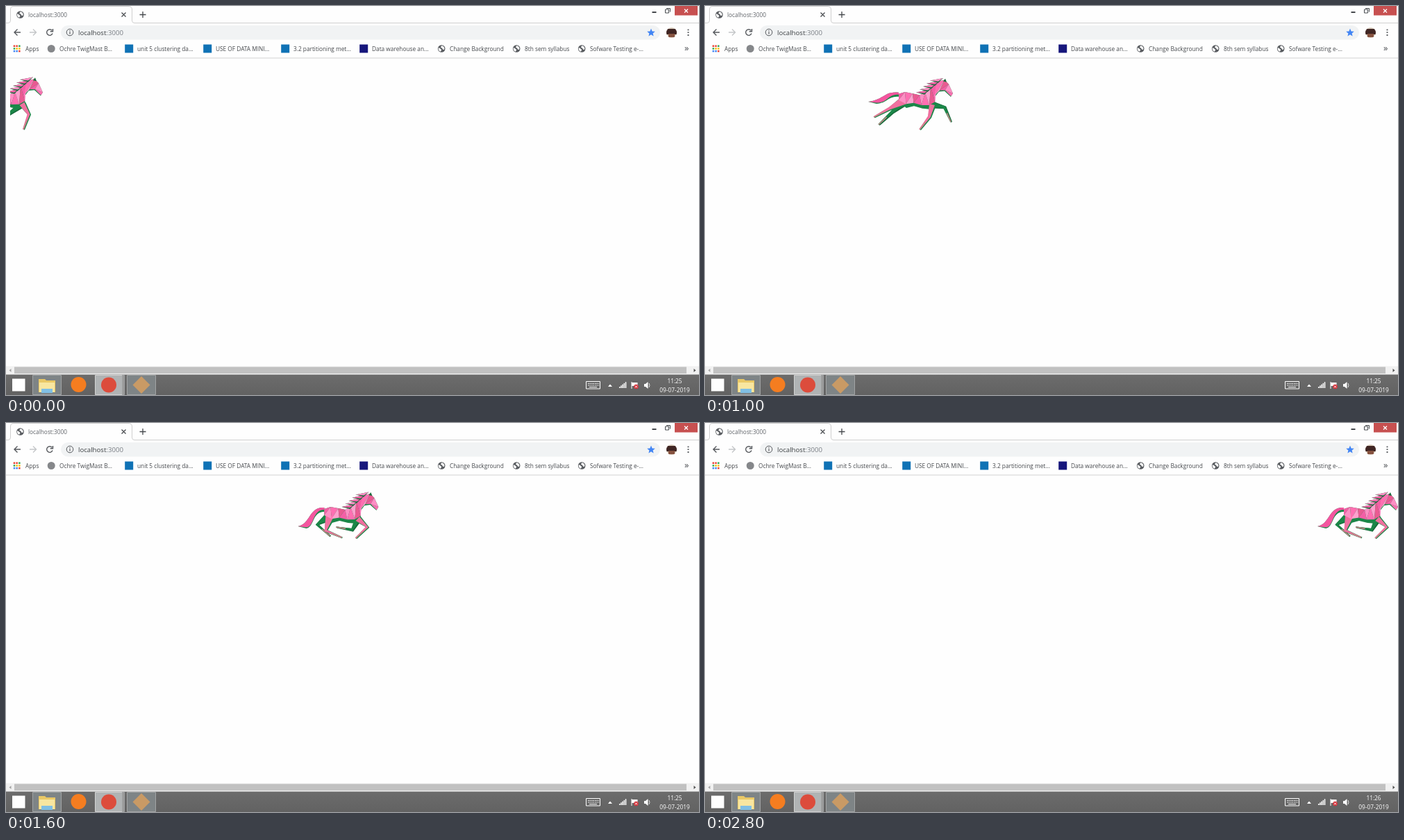
Animation of 998 by 561 pixels, one loop 3000 ms. Source, as an HTML page:

```html
<!DOCTYPE html>
<html lang="en">
<head>
<meta charset="utf-8">
<title>localhost:3000</title>
<style>
  html, body { margin: 0; width: 100%; height: 100%; overflow: hidden; background: #fefefe; }
  svg { display: block; width: 998px; height: 561px; font: 8.3px "Open Sans", "Noto Sans", sans-serif; }
</style>
</head>
<body>
<svg viewBox="0 0 998 561">
  <defs>
    <clipPath id="page"><rect x="6" y="76" width="992" height="443"/></clipPath>
    <clipPath id="face"><circle cx="958.5" cy="38.5" r="7.5"/></clipPath>
    <linearGradient id="bar" x2="0" y2="1"><stop stop-color="#6c6c6c"/><stop offset="1" stop-color="#626262"/></linearGradient>
    <g id="globe">
      <circle r="5.3" fill="#5a5d61"/>
      <path d="M-4.2-1.5L-1 .4 0 2-1.5 4.2A4.3 4.3 0 0 1-4.2-1.5M.2-4.2L-1.3-2 .8-.8 2.2 1.4 4.1 1A4.3 4.3 0 0 0 .2-4.2" fill="#fff"/>
    </g>
  </defs>

  <!-- window frame and tab -->
  <path d="M0 24.5H3Q6.5 24.5 6.5 21V5Q6.5.5 11 .5H176Q181.5.5 181.5 5V21Q181.5 24.5 185 24.5H998" fill="none" stroke="#cfcfcf"/>
  <use href="#globe" x="20.5" y="12.5"/>
  <text x="32" y="15.5" fill="#5f6368">localhost:3000</text>
  <g fill="none" stroke="#45484c" stroke-width="1.3">
    <path d="M166.500 9.500l6 6m0-6l-6 6M192.500 12.500h9m-4.500-4.500v9"/>
    <path d="M930.500 9h6" stroke-width="2"/>
    <path d="M949.500 5h5v5h-5zM951 3.500h5.500v5" stroke-width="1"/>
  </g>
  <rect x="963" width="33" height="13.5" fill="#c75050"/>
  <path d="M977 4.500l5 5m0-5l-5 5" stroke="#fff" stroke-width="1.3"/>

  <!-- toolbar -->
  <rect x="79" y="28" width="863" height="20.5" rx="10.25" fill="#f1f3f4"/>
  <g fill="none" stroke="#55585c" stroke-width="1.4">
    <path d="M21 38H12m4.500-4.500L12 38l4.500 4.500"/>
    <path d="M34 38h9.500m-4.500-4.500l4.500 4.500-4.500 4.500" stroke="#c4c6c9"/>
    <path d="M66.300 35.300A4.300 4.300 0 1 0 67 39.500M67.500 33v3.800h-3.800"/>
    <circle cx="92" cy="38" r="4.800" stroke-width="1"/>
    <path d="M92 37.200v3.400M92 35v1.200" stroke-width="1.2"/>
  </g>
  <text x="104" y="41.5" font-size="9.65" fill="#3c4043">localhost<tspan fill="#777c82">:3000</tspan></text>
  <path d="M929 32.500l1.600 3.900 4.200.3-3.200 2.700 1 4.100-3.600-2.200-3.600 2.200 1-4.100-3.200-2.700 4.200-.3z" fill="#4285f4"/>
  <g clip-path="url(#face)">
    <path d="M950 30h17v17h-17z" fill="#d9cdbd"/>
    <path d="M950 33h17v8h-17z" fill="#3f2523"/>
    <path d="M954 40h9v5h-9z" fill="#86523f"/>
  </g>
  <path d="M982.500 33.500v1.800m0 2v1.800m0 2v1.800" stroke="#55585c" stroke-width="1.9"/>
  <g id="bookmarks" fill="#46494d"></g>
  <path d="M0 75h998" stroke="#d2d2d2"/>

  <g clip-path="url(#page)"><g id="horse"></g></g>

  <!-- horizontal scrollbar -->
  <path d="M0 519.500h998v12H0z" fill="#f1f1f1"/>
  <path d="M12 520.500h968v9.500H12z" fill="#c1c1c1"/>
  <path d="M7.500 523v5l-3-2.500z" fill="#a3a3a3"/>
  <path d="M990.500 523v5l3-2.500z" fill="#505050"/>

  <!-- taskbar -->
  <path d="M0 531.500h998V561H0z" fill="url(#bar)"/>
  <path d="M9 537.500h18.500v18H9z" fill="#fff"/>
  <g stroke="#a2a4a5" fill="#7e8486">
    <path d="M38.500 532.500h41v28h-41z"/>
    <path d="M128.500 532.500h39v28h-39z" fill="#b0b3b4" stroke="#d2d2d2"/>
    <path d="M167.500 532.500h3v28h-3z" fill="#999"/>
    <path d="M174.500 532.500h41v28h-41z"/>
  </g>
  <path d="M47 538h9l2 2h13v17H47z" fill="#e9c866"/>
  <path d="M48 543h22v14H48z" fill="#f8e6a0"/>
  <path d="M51 552h16v6H51z" fill="#80bfe4"/>
  <circle cx="104.5" cy="546" r="11" fill="#f57d20"/>
  <circle cx="148" cy="546.5" r="11" fill="#dc4c3c"/>
  <path d="M195 534l12.500 12.500L195 559l-12.500-12.500z" fill="#c99a65"/>

  <!-- tray -->
  <g fill="none" stroke="#fff">
    <path d="M835.500 541.500h20v10.500h-20z"/>
    <path d="M838 544.500h16M838 547h16" stroke-dasharray="1.5 1"/>
    <path d="M840 549.700h11"/>
    <path d="M926 544q2 3 0 6" stroke-width=".8"/>
  </g>
  <g fill="#fff">
    <path d="M867 549h6l-3-3.500z"/>
    <g id="signal"></g>
    <path d="M900.500 542h1v10h-1zm1 1h8v5h-8zM919 545h2l3.500-3v10l-3.500-3h-2z"/>
  </g>
  <circle cx="907.5" cy="549" r="3.3" fill="#d5333b"/>
  <path d="M906 547.500l3 3m0-3l-3 3" stroke="#fff" stroke-width=".9"/>
  <g fill="#fff" text-anchor="middle">
    <text id="clock" x="963" y="544"></text>
    <text x="963" y="556.5">09-07-2019</text>
  </g>
</svg>

<script>
const byId = id => document.getElementById(id);
const repeat = (count, draw) => Array.from({ length: count }, (_, i) => draw(i)).join('');
const rect = (x, y, w, h, fill = '') => `<rect x="${x}" y="${y}" width="${w}" height="${h}" ${fill && `fill="${fill}"`}/>`;

// Bookmark: label start, label, icon painter given its centre
const globe = x => `<use href="#globe" x="${x}" y="61.5"/>`;
const square = color => x => rect(x - 6, 55.5, 12, 12, color);
const disc = x => `<circle cx="${x}" cy="61.5" r="5.5" fill="#85878a"/>`;
const dotColors = ['#ea4335', '#34a853', '#fbbc05', '#4285f4'];
const grid = x => repeat(9, i =>
  rect(x - 5.5 + i % 3 * 3.7, 56.5 + Math.floor(i / 3) * 3.7, 2.5, 2.5, dotColors[Math.floor(i / 2) % 4]));
const blue = square('#0f72b5');
byId('bookmarks').innerHTML = [
  [28, 'Apps', grid],
  [77, 'Ochre TwigMast B...', disc],
  [189, 'unit 5 clustering da...', blue],
  [302, 'USE OF DATA MINI...', blue],
  [414, '3.2 partitioning met...', blue],
  [527, 'Data warehouse an...', square('#17177c')],
  [639, 'Change Background', globe],
  [747, '8th sem syllabus', globe],
  [841, 'Sofware Testing e-...', globe]
].map(([x, label, icon]) => `${icon(x - 11.8)}<text x="${x}" y="64.5">${label}</text>`).join('') +
  '<text x="977" y="64.5" font-size="13">»</text>';

byId('signal').innerHTML = repeat(5, i => rect(883 + i * 2.2, 549 - i * 1.7, 1.5, 2 + i * 1.7));

const GREEN = '#1b8748', DARK = '#17693a';
const pinks = ['#f55fa6', '#ff8fc5', '#ff6fb2', '#ffa0ce', '#ea5a92'];

// Upper and lower contour of the trunk, neck and head
const topLine = [[38, 124], [47, 121], [58, 123], [68, 125], [76, 121], [84, 112], [93, 105], [104, 102], [110, 108], [116, 121]];
const underLine = [[38, 136], [49, 144], [60, 141], [72, 144], [84, 145], [91, 137], [89, 128], [96, 119], [104, 118], [113, 126]];

// Pose: lean (shift, drop, head drop), tail tip height, hooves (two hind, two front)
const stretched = [[6, 1.5, 3.5], 138, [[8, 160], [15, 171], [74, 178], [119, 167]]];
const landing = [[4, 1.5, 2], 142, [[12, 162], [20, 168], [52, 170], [92, 178]]];
const gathered = [[0, 0, 0], 149, [[46, 163], [63, 165], [55, 150], [83, 166]]];
const pushing = [[4, .5, .5], 144, [[34, 178], [70, 178], [120, 165], [89, 163]]];
const stride = [
  [0, stretched], [.05, landing], [.17, gathered], [.25, gathered],
  [.79, pushing], [.85, pushing], [.99, stretched], [1, stretched]
];
const STRIDE_LENGTH = 155;

const STEP = 200, LOOP = 3000;
const journey = [[0, -67], [600, 118], [1000, 235], [2000, 544], [2400, 676], [2800, 882]];

const blend = (a, b, t) => Array.isArray(a) ? a.map((v, i) => blend(v, b[i], t)) : a + (b - a) * t;

// Value at a position along a list of [position, value] keys
function along(keys, at) {
  const i = Math.max(1, keys.findIndex(([key]) => key >= at));
  const [from, a] = keys[i - 1], [to, b] = keys[i];
  return blend(a, b, (at - from) / (to - from));
}

const polygon = (points, fill) => `<polygon points="${points.join(' ')}" fill="${fill}"/>`;

// Middle joint of a two-bone limb; side is 1 for a knee, -1 for a hock
function bend([x, y], [hoofX, hoofY], upper, lower, side) {
  const dx = hoofX - x, dy = hoofY - y, d = Math.hypot(dx, dy);
  const reach = (upper ** 2 - lower ** 2 + d * d) / (2 * d);
  const out = side * Math.sqrt(Math.max(0, upper ** 2 - reach ** 2));
  return [x + (dx * reach + dy * out) / d, y + (dy * reach - dx * out) / d];
}

// Tapered limb through its joints
function limb(joints, widths, fill, shift = 0) {
  const left = [], right = [];
  joints.forEach(([x, y], i) => {
    const [ax, ay] = joints[Math.max(i - 1, 0)], [bx, by] = joints[Math.min(i + 1, joints.length - 1)];
    const k = widths[i] / 2 / Math.hypot(bx - ax, by - ay);
    const nx = (by - ay) * k, ny = (ax - bx) * k;
    left.push([x + shift - nx, y + shift / 2 - ny]);
    right.unshift([x + shift + nx, y + shift / 2 + ny]);
  });
  return polygon([...left, ...right], fill);
}

function drawLeg(hip, hoof, isHind, shaded) {
  const joint = isHind ? bend(hip, hoof, 23, 25, -1) : bend(hip, hoof, 18, 23, 1);
  const joints = [hip, joint, hoof];
  const widths = [isHind ? 15 : 10, 5, 2.2];
  return limb(joints, widths, shaded ? DARK : GREEN, 1) +
    limb(joints, widths.map(w => w * .8), shaded ? GREEN : '#f0709f') +
    limb([blend(joint, hoof, .4), hoof], [1.6, 1.4], '#c98489');
}

function drawTail([x, y], tip) {
  const band = (thickness, fill) => `<path fill="${fill}" d="M${x} ${y - 2}C${x - 22} ${y - 4} ${x - 20} ${tip - 3} 0 ${tip}` +
    `L12 ${tip + thickness / 2}C${x - 14} ${tip + 1} ${x - 18} ${y + thickness - 2} ${x} ${y + thickness - 2}z"/>`;
  return band(6, GREEN) + band(3, '#f4559f');
}

function drawHorse(phase) {
  const [[dx, dy, tilt], tailTip, hooves] = along(stride, phase);
  const lean = ([x, y]) => [x + dx, y + dy + tilt * x / 116];
  const top = topLine.map(lean), under = underLine.map(lean);
  const pinkEdge = top.map((point, i) => blend(point, under[i], i < 5 ? .75 : .88));

  const farSide = phase > .03 && phase < .5 ? 0 : 1;
  const legs = shaded => hooves.map((hoof, i) => (i % 2 === farSide) === shaded
    ? drawLeg(lean(i < 2 ? [46, 133] : [86, 138]), hoof, i < 2, shaded) : '').join('');

  const facets = repeat(top.length - 1, i =>
    polygon([top[i], top[i + 1], pinkEdge[i]], pinks[i * 2 % 5]) +
    polygon([top[i + 1], pinkEdge[i + 1], pinkEdge[i]], pinks[(i * 2 + 1) % 5]));

  const mane = repeat(5, i => {
    const x = 75 + i * 5, y = 122 - i * 4.4;
    const lock = shift => [[x, y + shift], [x - 12, y - 1], [x + 7, y - 5]].map(lean);
    return polygon(lock(2), DARK) + polygon(lock(0), pinks[i % 3]);
  });
  const ear = polygon([[102, 104], [105, 100], [107, 105]].map(lean), DARK);

  return legs(true) + drawTail(top[0], tailTip) +
    polygon([...top, ...under.reverse()], GREEN) +
    legs(false) + facets + mane + ear;
}

let shown = -1;
function render() {
  const time = Math.floor(performance.now() / STEP) * STEP % LOOP;
  if (time !== shown) {
    shown = time;
    const x = along(journey, time);
    const phase = ((x - 235) / STRIDE_LENGTH + 2) % 1;
    byId('horse').innerHTML = drawHorse(phase);
    byId('horse').setAttribute('transform', `translate(${x})`);
    byId('clock').textContent = time < 2200 ? '11:25' : '11:26';
  }
  requestAnimationFrame(render);
}
render();
</script>
</body>
</html>
```
